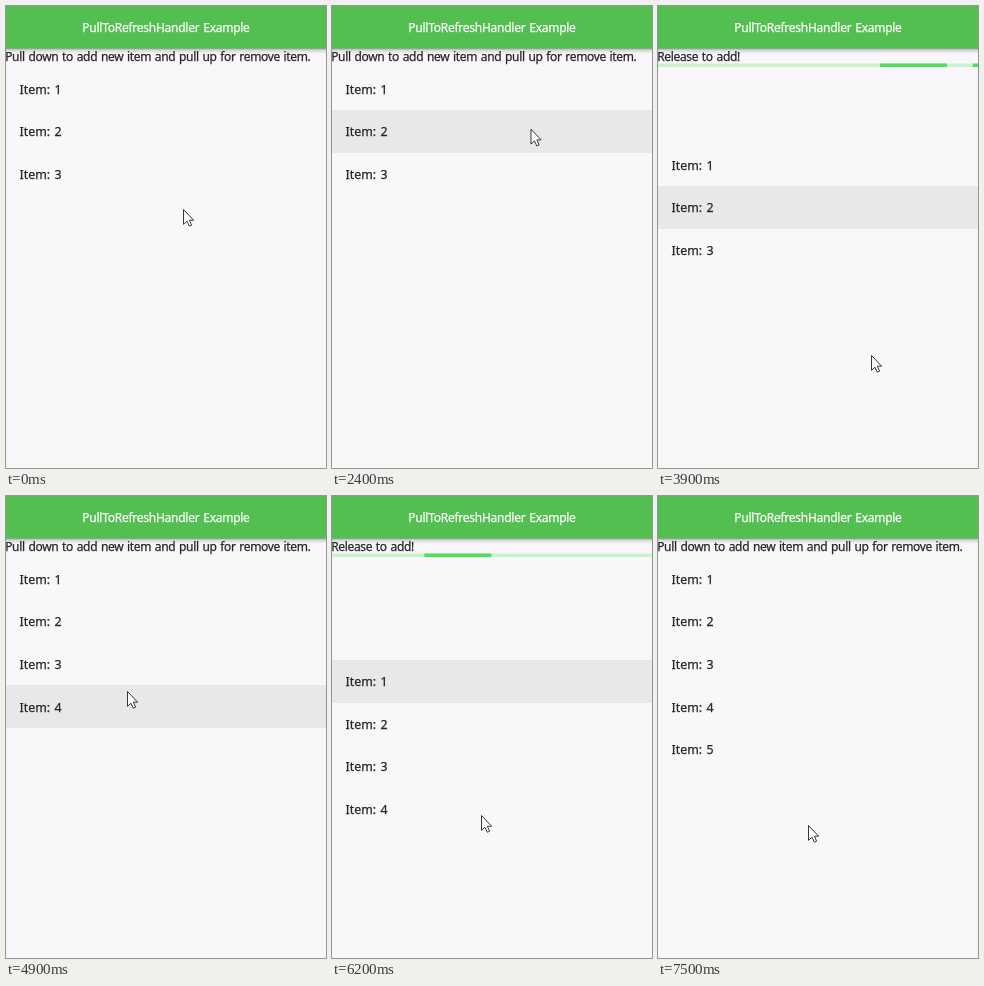
Animation, 320 px wide and 462 px high, one loop 8 s. Source, as an HTML page with a canvas:

```html
<!DOCTYPE html>
<html lang="en">
<head>
<meta charset="utf-8">
<title>Pull to refresh</title>
<style>
html, body { margin: 0; width: 320px; height: 462px; overflow: hidden; background: #f9f7fa; }
canvas { display: block; }
</style>
</head>
<body>
<canvas width="320" height="462"></canvas>
<script>
const ctx = document.querySelector('canvas').getContext('2d');
const W = 320, H = 462, LOOP = 8000, STEP = 100;
const LIST_TOP = 61.4, ROW = 42.67;
const SLIDE = 1240, PAUSE = 520, BAR = 67, REBOUND = 400;
const INK = '#262626', PAPER = '#f9f7fa';

// Where the pointer turns; it eases from stop to stop.
const stops = [
  { t: 0, x: 177, y: 203 },
  { t: 1400, x: 303, y: 152 },
  { t: 2500, x: 196, y: 122 },
  { t: 2900, x: 201, y: 310 },
  { t: 3900, x: 213, y: 349 },
  { t: 4500, x: 203, y: 349 },
  { t: 4900, x: 121, y: 195 },
  { t: 5500, x: 127, y: 97 },
  { t: 6300, x: 150, y: 329 }
];
const drags = [
  { press: 2500, armed: 2976, release: 4000, row: 1, pull: 0.678 },
  { press: 5500, armed: 6067, release: 6850, row: 0, pull: 0.932 }
];

function pointerAt(t) {
  const i = stops.findIndex(s => s.t > t);
  if (i < 0) return stops[stops.length - 1];
  const a = stops[i - 1], b = stops[i];
  const p = (t - a.t) / (b.t - a.t), e = p * p * (3 - 2 * p);
  return { x: a.x + (b.x - a.x) * e, y: a.y + (b.y - a.y) * e };
}

// The list lags behind the pointer, then springs back after release.
function listOffset(drag, t) {
  const travel = pointerAt(Math.min(t, drag.release)).y - pointerAt(drag.press).y;
  const held = drag.pull * travel ** 0.87;
  const p = Math.max(0, t - drag.release) / REBOUND;
  return p < 0.25 ? held * (1 - 8 * p * p) : held / 2 * 2 ** (-10 * (p - 0.25) / 0.75);
}

function rect(color, x, y, w, h) {
  ctx.fillStyle = color;
  ctx.fillRect(x, y, w, h);
}

function text(str, x, y, { color = INK, size = 12, spacing = 0, align = 'left' } = {}) {
  ctx.font = `${size}px "Noto Sans", sans-serif`;
  ctx.letterSpacing = spacing + 'px';
  ctx.wordSpacing = '1px';
  ctx.textAlign = align;
  ctx.fillStyle = ctx.strokeStyle = color;
  ctx.lineWidth = 0.25;
  ctx.fillText(str, x, y);
  ctx.strokeText(str, x, y);
}

function drawHeader() {
  const shade = ctx.createLinearGradient(0, 42, 0, 48);
  shade.addColorStop(0, 'rgba(0,0,0,.38)');
  shade.addColorStop(0.4, 'rgba(0,0,0,.13)');
  shade.addColorStop(1, 'rgba(0,0,0,0)');
  rect(shade, 0, 42, W, 6);
  rect('#53bf51', 0, 0, W, 42.5);
  text('PullToRefreshHandler Example', W / 2, 25.7,
    { color: '#fff', spacing: -0.26, align: 'center' });
}

function drawProgress(time) {
  rect('#c8f3cb', 0, 57.5, W, 3.5);
  const cycle = time % (SLIDE + PAUSE);
  for (const delay of [0, PAUSE]) {
    const p = (cycle - delay) / SLIDE;
    if (p > 0 && p < 1) rect('#4be259', W * (1 - (1 - p) ** 3), 57.5, BAR, 3.5);
  }
}

function drawItem(i, offset, active) {
  const top = LIST_TOP + offset + i * ROW;
  const y = Math.round(top);
  if (active) rect('#e9e7ea', 0, y, W, Math.round(top + ROW) - y);
  text('Item: ' + (i + 1), 13.6, top + 26.1, { size: 12.4 });
}

function drawPointer({ x, y }) {
  const arrow = new Path2D('M.5 .5V15.3L4 12.2L6.3 17.2L8.6 16.2L6.4 11.2H10.6Z');
  ctx.save();
  ctx.translate(x, y);
  ctx.fillStyle = '#fff';
  ctx.fill(arrow);
  ctx.strokeStyle = '#222';
  ctx.lineWidth = 0.9;
  ctx.stroke(arrow);
  ctx.restore();
}

function draw(t) {
  const drag = drags.find(d => t >= d.press && t < d.release + REBOUND);
  const held = drag && t < drag.release;
  const armed = drag && t >= drag.armed;
  const offset = drag ? listOffset(drag, t) : 0;
  const count = 3 + drags.filter(d => t >= d.release).length;
  const pointer = pointerAt(t);
  const active = held ? drag.row : Math.floor((pointer.y - LIST_TOP - offset) / ROW);

  rect(PAPER, 0, 0, W, H);
  for (let i = 0; i < count; i++) drawItem(i, offset, i === active);
  drawHeader();
  const label = armed ? 'Release to add!' : 'Pull down to add new item and pull up for remove item.';
  text(label, -0.8, 54.8, { spacing: -0.35 });
  if (armed) drawProgress(t - drag.armed);
  drawPointer(pointer);
}

const start = performance.now();
function tick() {
  const t = (performance.now() - start) % LOOP;
  draw(Math.floor(t / STEP) * STEP);
  requestAnimationFrame(tick);
}
tick();
</script>
</body>
</html>
```
